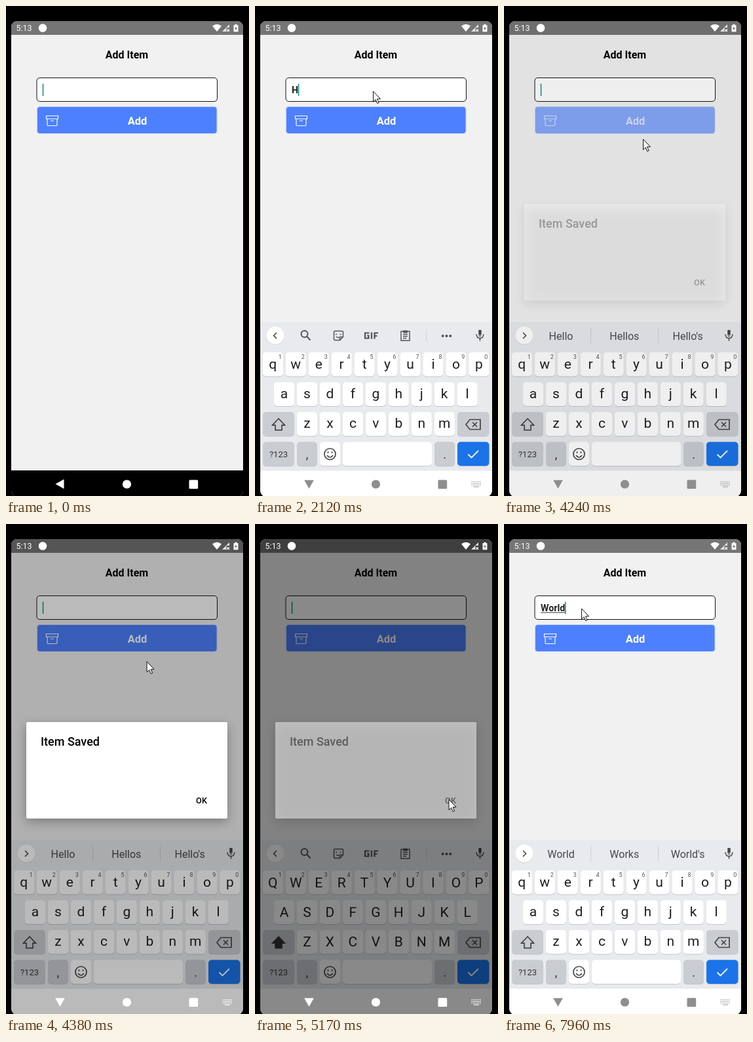
Animation, 371 px wide and 747 px high, one loop 8 s. Source, as an HTML page with a canvas:

```html
<!DOCTYPE html>
<html lang="en">
<head>
<meta charset="utf-8">
<title>Add Item</title>
<style>
  html, body { margin: 0; width: 100%; height: 100%; overflow: hidden; background: #000; }
  canvas { display: block; width: 371px; height: 747px; }
</style>
</head>
<body>
<canvas id="stage"></canvas>
<script>
const W = 371, H = 747, LOOP = 8000;
const canvas = document.getElementById('stage');
const ctx = canvas.getContext('2d');
const ratio = window.devicePixelRatio || 1;
canvas.width = W * ratio;
canvas.height = H * ratio;

// Timelines: [start ms, value], held until the next entry
const TEXT = [[0, ''], [1990, 'H'], [2460, 'He'], [2650, 'Hel'], [2850, 'Hell'], [2990, 'Hello'], [4230, ''],
  [6560, 'W'], [7090, 'Wo'], [7290, 'Wor'], [7560, 'Worl'], [7690, 'World']];
const UNDERLINED = [[0, 0], [2260, 1], [2650, 2], [2850, 3], [3250, 5], [4230, 0],
  [6890, 1], [7290, 2], [7560, 3], [7890, 5]];
const WORDS = [[0, ''], [2260, 'H He Hey'], [2650, 'He Hey Her'], [2850, 'Hel Hello Help'], [2990, "Hell Hello He'll"],
  [3250, "Hello Hellos Hello's"], [4500, ''], [6890, 'W We What'], [7290, 'Wo Work Would'],
  [7560, 'Wor Work World'], [7690, 'Wor World Would'], [7890, "World Works World's"]];
const UPPER = [[0, true], [2100, false], [4500, true], [6690, false]];
const CARET = [[0, 1], [330, 0], [800, 1], [1300, 0], [1860, 1], [3650, 0], [4150, 1], [5600, 0], [6090, 1]];
const POINTER = [[330, 293, 718], [870, 180.5, 130], [3650, 180.5, 130], [4000, 212.5, 176], [4170, 212.5, 176],
  [4235, 212.5, 203], [4320, 212.5, 203], [4900, 296, 420], [5250, 296, 420], [5840, 118.5, 129]];

const at = (list, t) => list.reduce((v, [start, value]) => t >= start ? value : v, list[0][1]);
const ramp = (t, a, b) => Math.min(1, Math.max(0, (t - a) / (b - a)));
const smooth = p => p * p * (3 - 2 * p);
const mix = (a, b, p) => a + (b - a) * p;

function rect(x, y, w, h, color, r = 0) {
  ctx.fillStyle = color;
  ctx.beginPath();
  ctx.roundRect(x, y, w, h, r);
  ctx.fill();
}

function dot(x, y, r, color) {
  ctx.fillStyle = color;
  ctx.beginPath();
  ctx.arc(x, y, r, 0, 7);
  ctx.fill();
}

function icon(d, x, y, { fill, line, width = 1.5 }) {
  const path = new Path2D(d);
  ctx.save();
  ctx.translate(x, y);
  if (fill) { ctx.fillStyle = fill; ctx.fill(path); }
  if (line) { ctx.strokeStyle = line; ctx.lineWidth = width; ctx.stroke(path); }
  ctx.restore();
}

function label(text, x, y, size, color, weight = 400, align = 'center') {
  ctx.font = `${weight} ${size}px Roboto, sans-serif`;
  ctx.textAlign = align;
  ctx.fillStyle = color;
  ctx.fillText(text, x, y);
}

function drawForm(t) {
  rect(8, 23, 354, 724, '#f1f1f1');
  rect(8, 23, 354, 21, '#757575');
  rect(8, 708, 354, 39, '#000');
  label('Add Item', 184.5, 79.5, 16, '#000', 700);

  rect(47, 109.5, 275.5, 36, '#fff', 4.5);
  ctx.strokeStyle = '#111';
  ctx.lineWidth = 1;
  ctx.stroke();
  const text = at(TEXT, t);
  label(text, 56, 132.8, 14.2, '#222', 700, 'left');
  const end = 56 + ctx.measureText(text).width;
  const marked = text.slice(0, at(UNDERLINED, t));
  if (marked) rect(56, 134.5, ctx.measureText(marked).width, 1, '#333');
  if (at(CARET, t)) rect(end - 0.2, 118.5, 1.5, 18.5, '#0b8f83');

  const opacity = t < 4100 ? mix(1, 0.2, ramp(t, 3930, 4040)) : mix(0.2, 1, ramp(t, 4150, 4310));
  ctx.globalAlpha = opacity;
  rect(47.5, 153.5, 274.5, 41, '#4d80ff', 4);
  ctx.strokeStyle = '#c3d0f2';
  ctx.stroke();
  icon('M-9,-8H9V-3.5H-9Z M-7.5,-3.5V5.5Q-7.5,7 -6,7H6Q7.5,7 7.5,5.5V-3.5 M-2.5,-0.5H2.5', 70.5, 175.5,
    { line: '#fff', width: 1.2 });
  label('Add', 200.5, 180.8, 16.5, '#fff', 700);
  ctx.globalAlpha = 1;
}

function key(x, y, w, color = '#fff') {
  rect(x, y + 1, w, 36.5, '#c3c5c9', 5);
  rect(x, y, w, 36.5, color, 5);
}

function drawStrip(words) {
  const ink = '#50545a';
  dot(31, 503, 13.8, '#d6d8db');
  dot(31, 502.3, 13.5, '#fff');
  icon(words ? 'M-2,-4.5L2.5,0L-2,4.5' : 'M2,-4.5L-2.5,0L2,4.5', 31, 502.5, { line: '#444' });
  icon('M-2.2,-7.5H2.2V1H-2.2Z M-2.2,-5Q0,-11 2.2,-5 M-2.2,0Q0,5.5 2.2,0', 343.5, 501.5, { fill: '#444' });
  icon('M-5.5,-1Q-5,5 0,5T5.5,-1 M0,5V9', 343.5, 501.5, { line: '#444' });
  if (words) {
    words.split(' ').forEach((word, i) => label(word, 87 + i * 96.8, 508.7, 16, '#46494d'));
    rect(132, 491, 1, 23, '#cdd0d4');
    rect(235, 491, 1, 23, '#cdd0d4');
    return;
  }
  icon('M3,-2A5,5 0 1 1 -7,-2A5,5 0 1 1 3,-2 M1.5,1.5L7,7.5', 77.5, 502, { line: ink, width: 2 });
  icon('M-5,-7H5Q7,-7 7,-5V2L2,7H-5Q-7,7 -7,5V-5Q-7,-7 -5,-7Z M2,7V2H7 M-3.5,-3V-1 M3,-3V-1 M-3.5,1.5Q-1,4 1,2.5',
    127.5, 502.5, { line: ink });
  icon('M-3,-4H-9.5V4H-4V0H-6.5 M0.5,-5V5 M5,5V-4H10.5 M5,0.5H9', 177.5, 502.5, { line: ink, width: 2.2 });
  icon('M-6.5,-6.5H6.5V7.5H-6.5Z M-3.5,-2H3.5 M-3.5,1H3.5 M-3.5,4H1.5', 229.5, 502.5, { line: ink });
  rect(226, 494.5, 7, 4, ink, 1);
  rect(261, 493, 1, 19, '#ccd0d4');
  for (let i = -1; i <= 1; i++) dot(292.5 + i * 5.8, 503, 2, ink);
}

function drawKeys(upper) {
  const ink = '#1e1f21', gray = '#c9ccd1';
  const rows = [['qwertyuiop', 27.3, 528, 554], ['asdfghjkl', 44.5, 573.5, 599], ['zxcvbnm', 79.5, 619, 644]];
  for (const [letters, x0, y, base] of rows) {
    [...letters].forEach((c, i) => {
      const x = x0 + i * 34.95;
      key(x - 15.6, y, 31.2);
      label(upper ? c.toUpperCase() : c, x, base - (upper ? 0 : 0.8), 21, ink);
      if (y === 528) label((i + 1) % 10, x + 11, 538.3, 9, '#555');
    });
  }
  key(12, 619, 48, gray);
  icon('M0,-9L9.5,1H5V8.5H-5V1H-9.5Z', 36, 638, { fill: upper && '#333', line: '#333' });
  key(309, 619, 48.5, gray);
  icon('M-11,0L-5,-7.5H11V7.5H-5Z M-1,-3.5L6,3.5 M6,-3.5L-1,3.5', 333, 638, { line: '#444', width: 1.7 });

  key(12, 664.5, 48, gray);
  label('?123', 36, 688.3, 13, '#333');
  key(64, 664.5, 31, gray);
  label(',', 79.5, 689.5, 18, '#333');
  key(99, 664.5, 31);
  icon('M8.5,0A8.5,8.5 0 1 1 -8.5,0A8.5,8.5 0 1 1 8.5,0 M-4.5,2Q0,8 4.5,2 M-3,-3.8V-1.2 M3,-3.8V-1.2', 114.5, 683,
    { line: '#444', width: 1.7 });
  key(134, 664.5, 136);
  key(274, 664.5, 31, gray);
  label('.', 289.5, 689.5, 18, '#333');
  key(309, 664.5, 48.5, '#1a73e8');
  icon('M-7.5,0L-2.5,5L8,-5.5', 333, 683.5, { line: '#fff', width: 1.8 });
}

function drawKeyboard(t) {
  if (t < 1260) return;
  const shift = t < 1530 ? 75 * Math.exp(-(t - 1260) / 49) : 0;
  ctx.globalAlpha = mix(0.5, 1, ramp(t, 1260, 1330));
  if (shift) rect(8, 482.5, 354, 265, 'rgba(255,255,255,.5)');
  ctx.save();
  ctx.translate(0, shift);
  rect(8, 482, 354, 227, '#e8eaed');
  rect(8, 708.5, 354, 39, '#fff');
  drawStrip(at(WORDS, t));
  drawKeys(at(UPPER, t));
  ctx.restore();
  ctx.globalAlpha = 1;
}

function drawStatus() {
  label('5:13', 15.5, 38, 12.5, '#fff', 400, 'left');
  dot(56, 33.5, 6.3, '#fff');
  icon('M-7,-3Q0,-8.5 7,-3L0,5.5Z', 322, 33.5, { fill: '#fff' });
  icon('M-5.5,5L5.5,-6V-1H1V5Z', 335.5, 34, { fill: '#e4e4e4' });
  icon('M2,1.5L5.5,5 M5.5,1.5L2,5', 335.5, 34, { line: '#fff', width: 1.1 });
  icon('M-3.5,-4.5H-1.5V-6H1.5V-4.5H3.5V5.5H-3.5Z', 351, 33.7, { fill: '#fff' });
  icon('M0.5,-3L-2,1.2H0L-0.5,4L2,-0.2H0Z', 351, 33.7, { fill: '#666' });
}

function drawNav(t) {
  const white = t < 1260 || (t > 4330 && t < 5230);
  const color = white ? '#fff' : '#8e8e8e';
  const turn = t < 1060 ? 0 : mix(12, 90, smooth(ramp(t, 1310, 1500)));
  ctx.save();
  ctx.translate(82.5, 728.8);
  ctx.rotate(-turn * Math.PI / 180);
  icon('M-7,0L6,-7.3V7.3Z', 0, 0, { fill: color });
  ctx.restore();
  dot(184.5, 729, 6.6, color);
  rect(279.5, 722.5, 13.7, 13.5, color, 1.5);
  if (t < 1060) return;
  ctx.globalAlpha = white ? 0.8 : 0.6;
  for (let row = 0; row < 3; row++)
    for (let i = 0; i < 6; i++) rect(330.5 + i * 2.5, 724.5 + row * 2.6, 1.6, 1.6, color);
  rect(334, 732.3, 8, 1.5, color);
  ctx.globalAlpha = 1;
}

function drawDialog(alpha) {
  if (!alpha) return;
  ctx.globalAlpha = alpha;
  ctx.save();
  ctx.shadowColor = 'rgba(0,0,0,.3)';
  ctx.shadowBlur = 16 * ratio;
  ctx.shadowOffsetY = 5 * ratio;
  rect(31, 302, 307, 147, '#fff', 2);
  ctx.restore();
  label('Item Saved', 53, 338, 18, '#000', 500, 'left');
  label('OK', 298.5, 426.3, 12.7, '#000', 500);
  ctx.globalAlpha = 1;
}

function drawPointer(t) {
  if (t < POINTER[0][0]) return;
  let [, x, y] = POINTER[0];
  for (let i = 1; i < POINTER.length; i++) {
    const [t0] = POINTER[i - 1], [t1, nx, ny] = POINTER[i];
    const p = smooth(ramp(t, t0, t1));
    x = mix(x, nx, p);
    y = mix(y, ny, p);
  }
  icon('M0,0V16L3.7,12.6L6.2,18.5L8.6,17.5L6.1,11.7H11Z', x, y, { fill: '#fff', line: '#111', width: 1 });
}

function draw(t) {
  ctx.setTransform(ratio, 0, 0, ratio, 0, 0);
  rect(0, 0, W, H, '#000');
  ctx.save();
  ctx.beginPath();
  ctx.roundRect(8, 23, 354, 725, 9);
  ctx.clip();
  drawForm(t);
  drawKeyboard(t);
  const dim = 0.6 * ramp(t, 4200, 4600) * (1 - ramp(t, 5110, 5380));
  if (dim) rect(8, 23, 354, 725, `rgba(0,0,0,${dim})`);
  drawStatus();
  drawNav(t);
  drawDialog(ramp(t, 4200, 4330) * (1 - ramp(t, 5110, 5230)));
  ctx.restore();
  drawPointer(t);
}

const start = performance.now();
function tick() {
  draw((performance.now() - start) % LOOP);
  requestAnimationFrame(tick);
}
tick();
</script>
</body>
</html>
```
